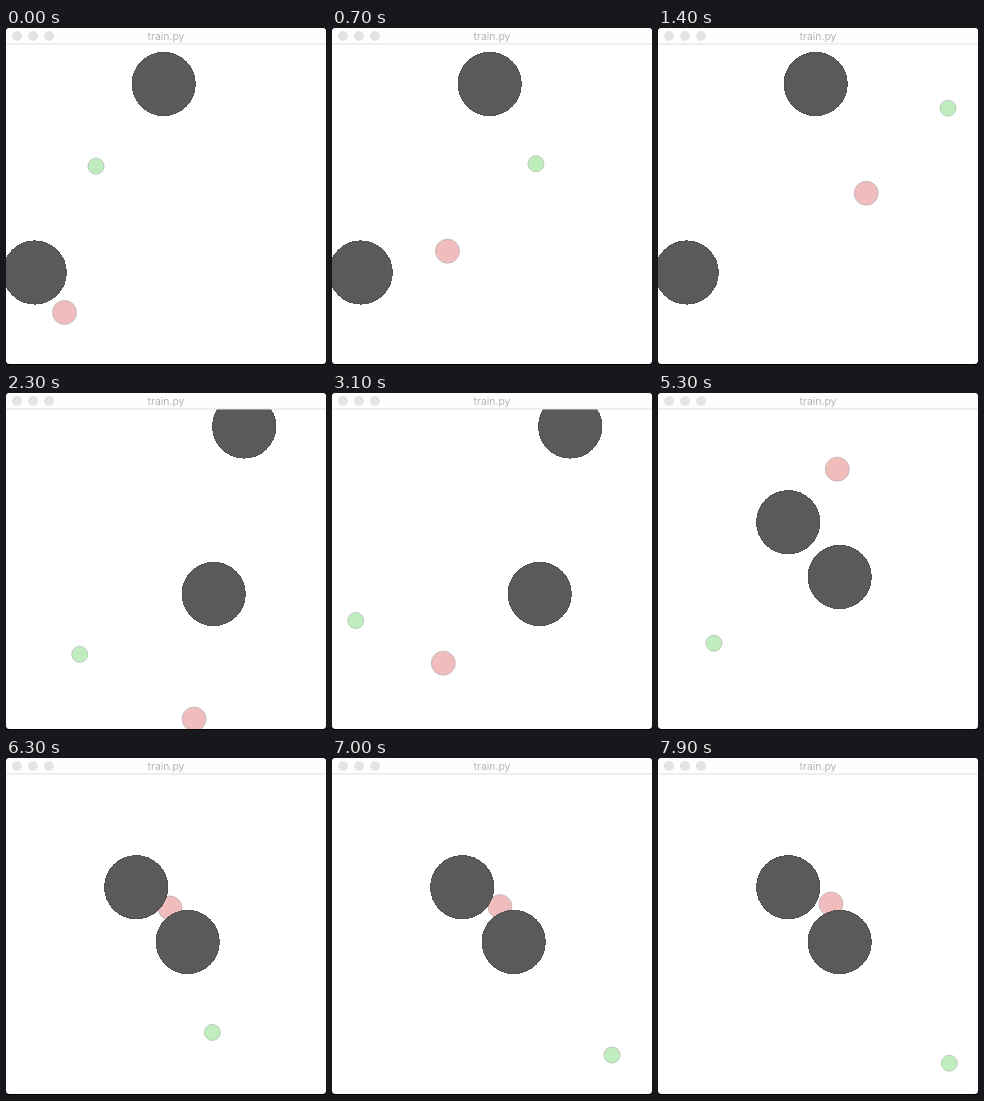
Animation of 320 by 337 pixels, one loop 8 s. Source, as an HTML page:

```html
<!DOCTYPE html>
<html>
<head>
<meta charset="utf-8">
<style>
html, body { margin: 0; overflow: hidden; background: #000; }
svg { display: block; }
text { font: 10.4px Inter, "Liberation Sans", sans-serif; fill: #b4b4b4; text-anchor: middle; }
.rock { fill: #5a5a5a; stroke: #525252; shape-rendering: crispEdges; }
#chaser { fill: #f0bcbc; stroke: #c6bbbe; }
#runner { fill: #c0edbd; stroke: #bccbbc; }
</style>
</head>
<body>
<svg width="320" height="337" viewBox="0 0 320 337">
  <clipPath id="win"><rect width="320" height="336" rx="3.5"/></clipPath>
  <g clip-path="url(#win)">
    <rect width="320" height="336" fill="#fff"/>
    <circle id="runner" r="8"/>
    <circle id="chaser" r="12"/>
    <circle id="rockA" class="rock" r="31.6"/>
    <circle id="rockB" class="rock" r="31.6"/>
    <rect width="320" height="16" fill="#fefefe"/>
    <rect y="15.5" width="320" height="1" fill="#e0e0e0"/>
    <g fill="#e4e4e4">
      <circle cx="11" cy="8" r="5"/><circle cx="27" cy="8" r="5"/><circle cx="43" cy="8" r="5"/>
    </g>
    <text x="160" y="11.7">train.py</text>
  </g>
</svg>
<script>
const TICK = 100, LOOP = 80;
const HOLDS = [6, 21, 38, 40, 56, 71]; // ticks on which the simulation stalls
const stepOf = tick => tick - HOLDS.filter(h => h <= tick).length;

// Paths are [tick, x, y] waypoints; the ticks between follow a smooth curve.
const episodes = [
  { rockA: [157.7, 56], rockB: [28.7, 244.5],
    chaser: [[0, 58.5, 284.5], [5, 103.5, 232], [14, 208.2, 165.2], [20, 276, 99]],
    runner: [[0, 90, 138.2], [5, 189, 141], [14, 290, 80.2], [16, 297, 66], [20, 272, 53]] },
  { rockA: [238.2, 33.5], rockB: [207.7, 201],
    chaser: [[22, 190, 327], [31, 111.3, 270.2], [39, 64, 171]],
    runner: [[22, 75, 262], [31, 23.8, 227.5], [33, 19.5, 205], [39, 46, 119]] },
  { rockA: [130.2, 129.2], rockB: [181.7, 184],
    chaser: [[41, 316, 63.5], [53, 179.3, 76.2], [59, 164, 146], [63, 164, 150], [79, 173, 146]],
    runner: [[41, 38, 87.5], [53, 56, 250.2], [63, 206.4, 274.4], [70, 280, 297], [79, 291.3, 305.2]] }
];

// Cubic curve through the waypoints; episodes that begin mid-loop start at rest.
function along(path, step) {
  const keys = path.map(([t, x, y]) => [stepOf(t), x, y]);
  const last = keys.length - 1;
  const slope = (k, c) => {
    if (!k && keys[0][0]) return 0;
    const p = keys[Math.max(0, k - 1)], q = keys[Math.min(last, k + 1)];
    return (q[c] - p[c]) / (q[0] - p[0]);
  };
  let i = 0;
  while (i < last - 1 && keys[i + 1][0] <= step) i++;
  const a = keys[i], b = keys[i + 1], span = b[0] - a[0];
  const u = Math.min(1, (step - a[0]) / span);
  return [1, 2].map(c => {
    const d = b[c] - a[c], m = slope(i, c) * span, n = slope(i + 1, c) * span;
    return a[c] + u * (m + u * (3 * d - 2 * m - n + u * (m + n - 2 * d)));
  });
}

function place(id, [x, y]) {
  const el = document.getElementById(id);
  el.setAttribute("cx", x);
  el.setAttribute("cy", y);
}

function draw() {
  const step = stepOf(Math.floor(performance.now() / TICK) % LOOP);
  const ep = episodes.findLast(e => stepOf(e.chaser[0][0]) <= step);
  for (const id of ["rockA", "rockB"]) place(id, ep[id]);
  for (const id of ["chaser", "runner"]) place(id, along(ep[id], step));
  requestAnimationFrame(draw);
}
draw();
</script>
</body>
</html>
```
